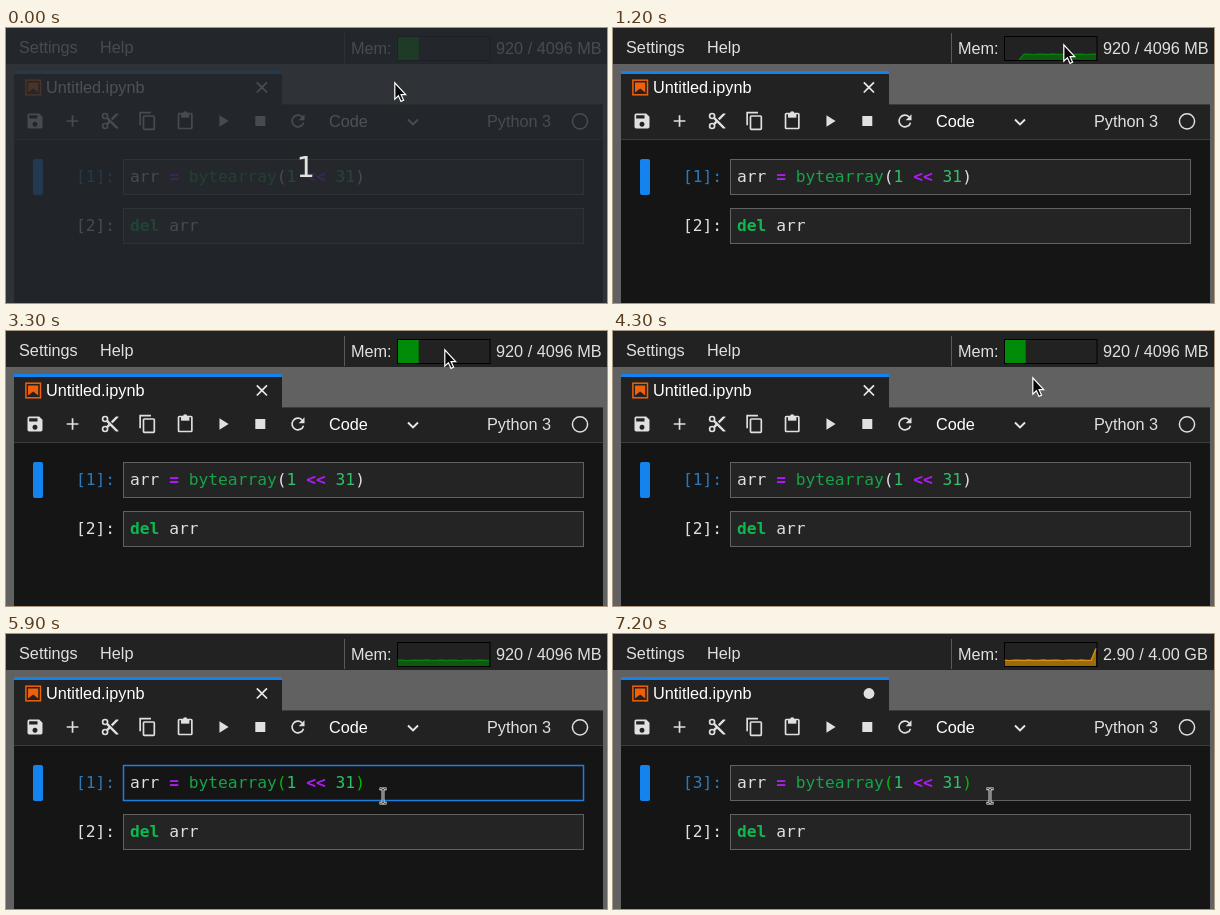
An HTML page that plays this animation: 601 by 275 pixels, repeating every 8 s.

```html
<!DOCTYPE html>
<html lang="en">
<head>
<meta charset="utf-8">
<title>Notebook memory meter</title>
<style>
html, body { margin: 0; width: 100%; height: 100%; overflow: hidden; background: #616161; }
svg { display: block; width: 601px; height: 275px; }
text { font: 16.25px "Liberation Sans", Arial, sans-serif; fill: #e0e0e0; white-space: pre; }
.code { font-family: "DejaVu Sans Mono", monospace; }
.prompt { fill: #2c79ba; }
.kw { fill: #0eb850; font-weight: bold; }
.fn { fill: #17a34a; }
.num { fill: #2fc068; }
.op { fill: #b01cf8; font-weight: bold; }
.icon { fill: #e0e0e0; }
.icon .line { fill: none; stroke: #e0e0e0; stroke-width: 2; }
.line { fill: none; }
.panel { fill: #222; }
.accent { fill: #1583ee; }
.cell { fill: #242424; stroke: #616161; }
.focus .cell { fill: #151515; stroke: #1c7fe0; stroke-width: 1.5; }
.match .par { fill: #0b0; }
</style>
</head>
<body>
<svg viewBox="0 0 601 275">
  <rect width="601" height="275" fill="#616161"/>
  <rect class="panel" width="601" height="36"/>
  <text x="13" y="25">Settings</text>
  <text x="94" y="25">Help</text>
  <path d="M338.5 5V35" stroke="#5a5a5a"/>
  <text x="345" y="26">Mem:</text>
  <text id="mem" x="490" y="26"></text>
  <rect x="391.5" y="8.5" width="92.5" height="24" fill="#222" stroke="#000"/>
  <rect id="bar" x="392" y="9" width="20.7" height="23" fill="#008c08"/>
  <g id="graph">
    <path id="area"/>
    <path id="trace" class="line" stroke-width="1.4"/>
  </g>

  <rect class="panel" x="8" y="43" width="268" height="34"/>
  <rect class="accent" x="8" y="43" width="268" height="3"/>
  <g fill="#f0600a">
    <rect class="line" x="19.9" y="52.2" width="14.6" height="14.6" stroke="#f0600a" stroke-width="1.5"/>
    <path d="M22 54.5h10.2v10l-5-4-5.2 4z"/>
  </g>
  <text x="40" y="65" style="fill:#fff">Untitled.ipynb</text>
  <path id="close" d="M250.8 54.3l10.2 10.2m0-10.2l-10.2 10.2" stroke="#e8e8e8" stroke-width="1.7"/>
  <circle id="dirty" cx="256" cy="59.5" r="5.4" fill="#e0e0e0"/>

  <rect x="8" y="112" width="589" height="163" fill="#151515"/>
  <rect class="panel" x="8" y="76" width="589" height="36"/>
  <path d="M276 76.5H597M8 111.5H597" stroke="#3c3c3c"/>
  <g id="tools" class="icon"></g>
  <text x="323" y="99" style="fill:#fff">Code</text>
  <path class="line" d="M402 91.5l5 5 5-5" stroke="#e8e8e8" stroke-width="1.9"/>
  <text x="481" y="99">Python 3</text>
  <circle class="line" cx="574" cy="93.3" r="7.6" stroke="#e0e0e0" stroke-width="1.5"/>

  <rect class="accent" x="27" y="131" width="10" height="36" rx="2"/>
  <g id="first">
    <text id="prompt" class="code prompt" x="70" y="154"></text>
    <rect class="cell" x="117.5" y="131.5" width="460" height="35"/>
    <text class="code" x="124" y="154">arr <tspan class="op">=</tspan> <tspan class="fn">bytearray</tspan><tspan class="par">(</tspan><tspan class="num">1</tspan> <tspan class="op">&lt;&lt;</tspan> <tspan class="num">31</tspan><tspan class="par">)</tspan></text>
    <rect id="caret" x="359.3" y="138" width="1.4" height="21" fill="#fff"/>
  </g>
  <text class="code" x="70" y="203">[2]:</text>
  <rect class="cell" x="117.5" y="180.5" width="460" height="35"/>
  <text class="code" x="124" y="203"><tspan class="kw">del</tspan> arr</text>

  <g id="veil">
    <rect width="601" height="275" fill="#24292e" opacity=".81"/>
    <text x="299.8" y="148.5" text-anchor="middle" style="font:29px 'DejaVu Sans',sans-serif;fill:#e4e2de">1</text>
  </g>
  <path id="arrow" d="M.8 .8V17.2L4.4 13.8 7 19.4 9.6 18.3 7.1 12.7H11.7Z" fill="#0a0a0a" stroke="#fff" stroke-width="1.2"/>
  <g id="beam" class="line">
    <path d="M-3.5-7.2H-1L0-6.4 1-7.2H3.5M0-6.4V6.4M-3.5 7.2H-1L0 6.4 1 7.2H3.5" stroke="#fff" stroke-width="2.8"/>
    <path d="M-3-7.2H-1L0-6.4 1-7.2H3M0-6.4V6.4M-3 7.2H-1L0 6.4 1 7.2H3" stroke="#111" stroke-width="1"/>
  </g>
</svg>
<script>
const $ = id => document.getElementById(id);
const LOOP = 8000;

// toolbar icons on a 24-unit grid, spaced evenly
const ICONS = [
  '<path fill-rule="evenodd" d="M5 3h12l4 4v12a2 2 0 0 1-2 2H5a2 2 0 0 1-2-2V5a2 2 0 0 1 2-2zM5 5v4h10V5zM12 13a3 3 0 1 0 .01 0z"/>',
  '<path class="line" d="M12 5v14M5 12h14"/>',
  '<circle class="line" cx="6" cy="6" r="3"/><circle class="line" cx="6" cy="18" r="3"/>' +
    '<path d="M9.6 7.6L22 20v1h-3l-7-7-2.4 2.4-2-2L10 12 7.6 9.6zM19 3l-6 6 2 2 7-7V3z"/>',
  '<path class="line" d="M3 17V2h13"/><rect class="line" x="7" y="6" width="13" height="16" rx="1"/>',
  '<rect class="line" x="4" y="3" width="16" height="18" rx="1"/><path d="M7 3h10v5H7z"/><circle cx="12" cy="3" r="2.6"/>',
  '<path d="M8 5v14l11-7z"/>',
  '<path d="M6 6h12v12H6z"/>',
  '<path class="line" d="M17 7A7 7 0 1 0 18.8 14"/><path d="M20 4v7h-7z"/>'
];
$('tools').innerHTML = ICONS.map((d, i) =>
  `<g transform="translate(${19 + i * 37.55} 83) scale(.833)">${d}</g>`).join('');

// pointer stops: time, x, y
const MOVES = [
  [0, 388, 54], [600, 393, 51], [700, 409, 41], [800, 431, 28], [900, 446, 18], [1000, 450, 16],
  [1700, 444, 40], [2000, 444, 41], [2100, 443, 36], [2200, 442, 27], [2300, 441, 18], [2400, 440, 14],
  [3200, 440, 15], [3300, 438, 18], [3400, 433, 25], [3500, 427, 33], [3600, 424, 37],
  [4300, 419, 46], [4400, 427, 27], [4500, 434, 12],
  [4900, 429, 32], [5000, 406, 95], [5100, 382, 150], [5200, 377, 162]
];
const POLLS = [2200, 3000, 4000, 5000, 7200];

const show = (id, on) => $(id).style.display = on ? '' : 'none';
const within = (t, a, b) => t >= a && t < b;

function drawGraph(t) {
  const polls = POLLS.filter(p => p <= t).length;
  const full = t >= 7200;
  const pts = [];
  const n = Math.min(19, 15 + polls);
  if (n < 19) pts.push([483 - (n + 1) * 4.8, 31.6]);
  for (let i = n; i >= 0; i--) {
    const y = full && !i ? 14.5 : 26.3 + 0.3 * Math.sin((polls - i) * 2.3);
    pts.push([483 - i * 4.8, y]);
  }
  const d = 'M' + pts.map(p => p.map(v => v.toFixed(2)).join(' ')).join('L');
  $('trace').setAttribute('d', d);
  $('area').setAttribute('d', `${d}V32H${pts[0][0]}Z`);
  $('trace').setAttribute('stroke', full ? '#d6900f' : '#087d0c');
  $('area').setAttribute('fill', full ? '#9c6a08' : '#0b5a10');
}

function draw(t) {
  const [, x, y] = MOVES.filter(m => m[0] <= t).pop();
  const beam = t >= 5100;
  show('arrow', !beam);
  show('beam', beam);
  $(beam ? 'beam' : 'arrow').setAttribute('transform', `translate(${x} ${y})`);

  const graph = within(t, 1200, 3200) || t >= 4700;
  show('bar', !graph);
  show('graph', graph);
  if (graph) drawGraph(t);

  const ran = t >= 6300, done = t >= 7200;
  $('mem').textContent = done ? '2.90 / 4.00 GB' : '920 / 4096 MB';
  $('prompt').textContent = done ? '[3]:' : ran ? '[*]:' : '[1]:';
  $('first').classList.toggle('focus', within(t, 5500, 6300));
  $('first').classList.toggle('match', t >= 5500);
  show('caret', within(t, 5500, 5900));
  show('close', !ran);
  show('dirty', ran);
  show('veil', t < 200);
}

const start = performance.now();
function tick() {
  draw((performance.now() - start) % LOOP);
  requestAnimationFrame(tick);
}
tick();
</script>
</body>
</html>
```
